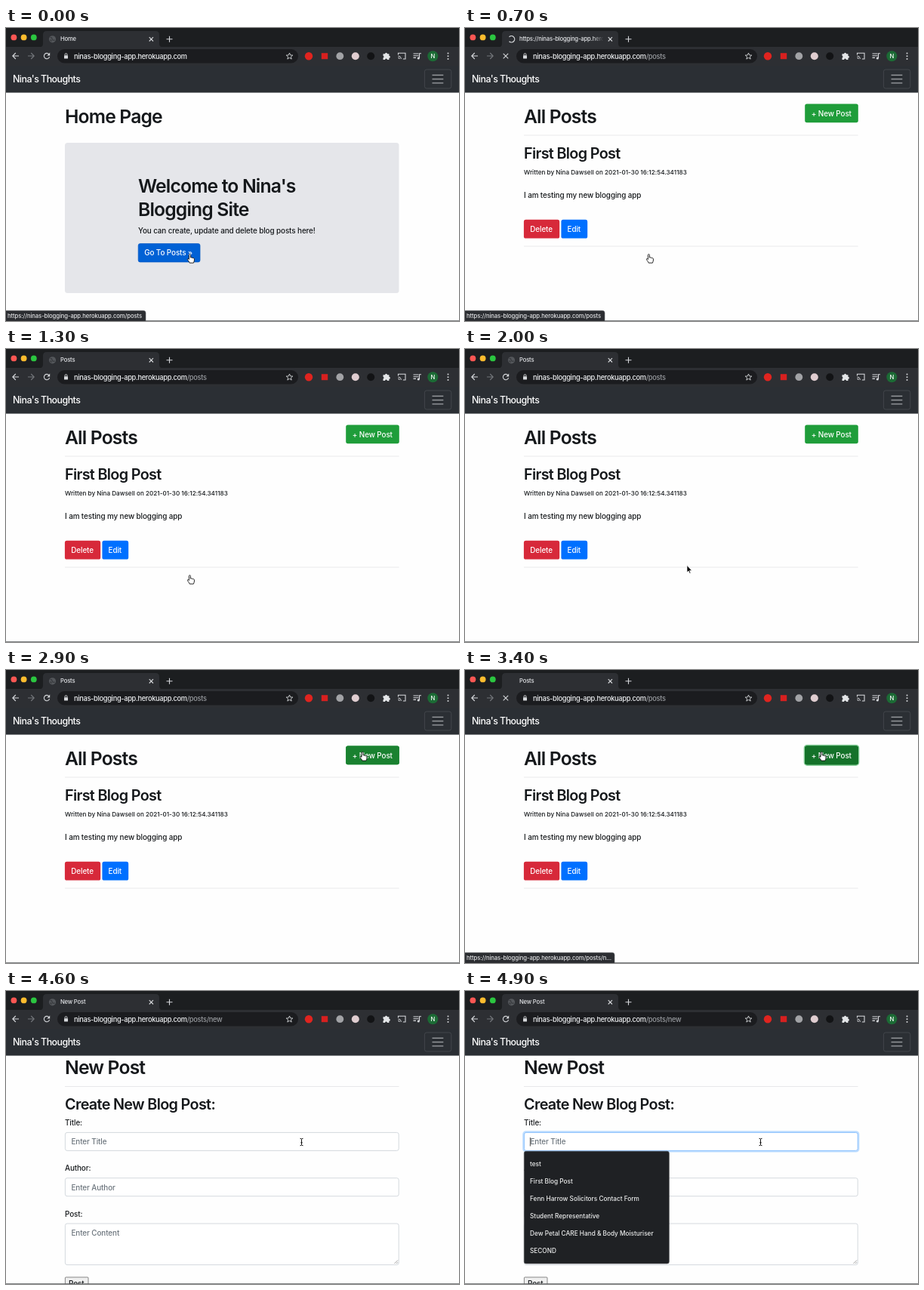
Write an HTML page that moves like this. It is 600x388 px and loops after 5000 ms.

```html
<!DOCTYPE html>
<html lang="en">
<head>
<meta charset="utf-8">
<title>Blogging app</title>
<style>
html, body { margin: 0; width: 100%; height: 100%; overflow: hidden; background: #fefefe; }
svg { display: block; width: 600px; height: 388px; }
text { font: 500 9.9px Inter, "Liberation Sans", sans-serif; letter-spacing: -.01em; font-optical-sizing: none; fill: #15181b; white-space: pre; }
.h1 { font-size: 24.7px; font-weight: 600; letter-spacing: -.034em; }
.h2 { font-size: 19.8px; font-weight: 600; letter-spacing: -.034em; }
.small { font-size: 8.15px; letter-spacing: .002em; }
.brand { font-size: 12.4px; letter-spacing: -.042em; fill: #fff; }
.tab { font-size: 7.7px; letter-spacing: -.025em; fill: #e4e6e9; }
.url { font-size: 9.25px; letter-spacing: -.034em; fill: #eceef0; }
.dim { fill: #989b9f; }
.tip { font-size: 7.7px; letter-spacing: -.013em; fill: #e2e3e5; }
.item { font-size: 8.25px; letter-spacing: 0; fill: #eceded; }
.btn { fill: #fff; }
.hint { fill: #6c757d; }
.hr { stroke: #e3e3e5; stroke-width: .8; }
.field { fill: #fff; stroke: #c9d0d6; stroke-width: .8; }
.icon { fill: none; stroke: #d6d8db; stroke-width: 1.1; }
.thin { stroke-width: .9; }
</style>
</head>
<body>
<svg viewBox="0 0 600 388">
  <defs>
    <linearGradient id="fade">
      <stop offset="0" stop-color="#2d2f33" stop-opacity="0"/>
      <stop offset="1" stop-color="#2d2f33"/>
    </linearGradient>
    <clipPath id="tabClip"><rect x="70" y="6" width="113" height="18"/></clipPath>
  </defs>
  <rect width="600" height="388" fill="#fefefe"/>

  <g id="home">
    <text class="h1" x="78" y="125.7">Home Page</text>
    <rect x="78" y="152" width="442.5" height="199" rx="3.5" fill="#e5e6ea"/>
    <text class="h1" x="175" y="218">Welcome to Nina's</text>
    <text class="h1" x="175" y="249">Blogging Site</text>
    <text x="175" y="271.5">You can create, update and delete blog posts here!</text>
    <rect id="goRing" x="174" y="284.5" width="84" height="26.5" rx="3.5" fill="none" stroke="#7fb2ee" stroke-width="2"/>
    <rect x="175.2" y="285.6" width="81.8" height="24.3" rx="2.5" fill="#0061d5" stroke="#0058c2" stroke-width=".7"/>
    <text class="btn" x="183.2" y="301.3">Go To Posts »</text>
  </g>

  <g id="posts">
    <text class="h1" x="78" y="125.7">All Posts</text>
    <rect id="newRing" x="449.7" y="99.8" width="71.6" height="26" rx="3.5" fill="none" stroke="#8fd0a0" stroke-width="2.2"/>
    <rect x="450.2" y="100.4" width="70.6" height="24.8" rx="2.6" fill="#1f9d3a"/>
    <rect id="newHover" x="450.2" y="100.4" width="70.6" height="24.8" rx="2.6" fill="#1a8130"/>
    <rect id="newDown" x="450.2" y="100.4" width="70.6" height="24.8" rx="2.6" fill="#15722a"/>
    <text class="btn" x="458.8" y="116.6">+ New Post</text>
    <path class="hr" d="M78 142H520.5M78 289H520.5"/>
    <text class="h2" x="78" y="173">First Blog Post</text>
    <text class="small" x="78" y="193.5">Written by Nina Dawsell on 2021-01-30 16:12:54.341183</text>
    <text x="78" y="224.5">I am testing my new blogging app</text>
    <rect x="77.9" y="253.8" width="47.3" height="24.8" rx="2.6" fill="#d7293a"/>
    <text class="btn" x="86.3" y="270">Delete</text>
    <rect x="127.4" y="253.8" width="34.8" height="24.8" rx="2.6" fill="#0070ff"/>
    <text class="btn" x="135.6" y="270">Edit</text>
  </g>

  <g id="new">
    <text class="h1" x="78" y="110.2">New Post</text>
    <path class="hr" d="M78 126.5H520.5"/>
    <text class="h2" x="78" y="157">Create New Blog Post:</text>
    <text x="78" y="178">Title:</text>
    <rect class="field" x="78.4" y="187.4" width="441.8" height="24" rx="2.6"/>
    <g id="focus">
      <rect x="77.2" y="186.2" width="444.2" height="26.4" rx="3.4" fill="none" stroke="#bfdeff" stroke-width="2"/>
      <rect x="78.4" y="187.4" width="441.8" height="24" rx="2.6" fill="#fff" stroke="#80bdff" stroke-width=".9"/>
    </g>
    <text class="hint" x="86.5" y="203">Enter Title</text>
    <path id="caret" d="M86.4 194V205.5" stroke="#222" stroke-width=".8"/>
    <text x="78" y="238.3">Author:</text>
    <rect class="field" x="78.4" y="247.7" width="441.8" height="24" rx="2.6"/>
    <text class="hint" x="86.5" y="263.5">Enter Author</text>
    <text x="78" y="298.7">Post:</text>
    <rect class="field" x="78.4" y="308" width="441.8" height="54.6" rx="2.6"/>
    <path d="M514.5 361L519 356.5M517.2 361L519 359.2" stroke="#777" stroke-width=".7"/>
    <text class="hint" x="86.5" y="323.7">Enter Content</text>
    <rect x="78.4" y="379" width="30.6" height="16" rx="1" fill="#efefef" stroke="#6b6b6b" stroke-width=".8"/>
    <text x="83" y="391">Post</text>
    <g id="list">
      <rect x="78.3" y="212.3" width="192" height="148.6" rx="2.5" fill="#1f2124" stroke="#45474a" stroke-width=".7"/>
      <text class="item" x="86" y="232.3">test</text>
      <text class="item" x="86" y="255.3">First Blog Post</text>
      <text class="item" x="86" y="278.3">Fenn Harrow Solicitors Contact Form</text>
      <text class="item" x="86" y="301.3">Student Representative</text>
      <text class="item" x="86" y="324.3">Dew Petal CARE Hand &amp; Body Moisturiser</text>
      <text class="item" x="86" y="347.3">SECOND</text>
    </g>
  </g>

  <!-- browser chrome -->
  <rect width="600" height="26" fill="#1c1e20"/>
  <circle cx="10.4" cy="12.4" r="3.9" fill="#fc5753"/>
  <circle cx="23.6" cy="12.4" r="3.9" fill="#fdbc2e"/>
  <circle cx="36.8" cy="12.4" r="3.9" fill="#2bc640"/>
  <path d="M44 25.5Q49 25.5 49 20.5V9Q49 4 54 4H198Q203 4 203 9V20.5Q203 25.5 208 25.5Z" fill="#2d2f33"/>
  <g id="globe">
    <circle cx="61.5" cy="14.8" r="4.6" fill="#54575b"/>
    <path d="M58.5 13Q61 11.8 61 14.3T64.8 16M60 17.8Q60.5 15.8 58 15.8" fill="none" stroke="#36383c" stroke-width="1.2"/>
  </g>
  <path id="spin" d="M61.5 10.6A4.2 4.2 0 1 1 57.3 14.8" fill="none" stroke="#e0e2e5" stroke-width="1.2"/>
  <g clip-path="url(#tabClip)">
    <text id="title" class="tab" x="72" y="17.3"></text>
    <rect x="169" y="8" width="14.5" height="14" fill="url(#fade)"/>
  </g>
  <path class="icon" d="M189.7 12.2L195 17.5M195 12.2L189.7 17.5M212.5 14.8H220.5M216.5 10.8V18.8"/>
  <rect y="25" width="600" height="25" fill="#2d2f33"/>
  <path class="icon" d="M17 37H9M12.8 33L8.8 37L12.8 41"/>
  <path class="icon" style="stroke:#73767a" d="M29 37H37M33.2 33L37.2 37L33.2 41"/>
  <g id="reload">
    <path class="icon" d="M57 34.8A3.7 3.7 0 1 0 57.6 38.3"/>
    <path d="M58.2 32.6V36.4H54.4Z" fill="#d6d8db"/>
  </g>
  <path id="stop" class="icon" d="M50.7 33.8L57.2 40.3M57.2 33.8L50.7 40.3"/>
  <rect x="68" y="28" width="319" height="18.5" rx="9.25" fill="#1b1c1f"/>
  <rect x="77" y="36.2" width="5" height="4.4" rx=".5" fill="#d6d8db"/>
  <path class="icon thin" d="M78.1 36.4V35A1.4 1.4 0 0 1 80.9 35V36.4"/>
  <text class="url" x="90" y="40.5">ninas-blogging-app.herokuapp.com<tspan id="path" class="dim"></tspan></text>
  <path class="icon thin" d="M375.5 33L376.7 35.9 379.8 36.1 377.4 38.1 378.2 41.1 375.5 39.4 372.8 41.1 373.6 38.1 371.2 36.1 374.3 35.9Z"/>
  <circle cx="401" cy="37.2" r="5.2" fill="#e0241f"/>
  <rect x="417.8" y="33.2" width="8.4" height="8" fill="#d8201f"/>
  <circle cx="442.3" cy="37.2" r="4.9" fill="#a2a3a6"/>
  <circle cx="462.8" cy="37.2" r="5" fill="#e0cdd0"/>
  <circle cx="483.2" cy="37.2" r="5" fill="#121315"/>
  <path d="M499.5 34.3H502A1.5 1.5 0 1 1 505 34.3H507.4V36.8A1.5 1.5 0 1 1 507.4 39.8V42H505A1.5 1.5 0 0 0 502 42H499.5V39.6A1.5 1.5 0 0 0 499.5 36.8Z" fill="#e4e6e8"/>
  <path class="icon" d="M519.5 35.5V33.2H529V41H525.8M519.5 37.2A3.8 3.8 0 0 1 523.3 41M519.5 39.4A1.6 1.6 0 0 1 521.1 41"/>
  <path class="icon" d="M539.5 34H546.5M539.5 36.7H546.5M539.5 39.4H543M547.5 40V33.8H550"/>
  <circle cx="546.3" cy="40" r="1.6" fill="#d6d8db"/>
  <circle cx="565.3" cy="37.2" r="7" fill="#1c6b35"/>
  <text class="tab" x="562.5" y="40" style="fill:#fff">N</text>
  <path d="M585.5 33.4V33.5M585.5 37.2V37.3M585.5 41V41.1" stroke="#d6d8db" stroke-width="2" stroke-linecap="round"/>

  <rect y="50" width="600" height="35.6" fill="#2b2f34"/>
  <text class="brand" x="9" y="72">Nina's Thoughts</text>
  <rect x="554.4" y="55" width="35.4" height="25" rx="2.8" fill="none" stroke="#484c51" stroke-width=".8"/>
  <path d="M564.5 62.3H579.3M564.5 67.6H579.3M564.5 72.9H579.3" stroke="#a0a3a6" stroke-width="1.2"/>
  <path d="M0 387.6H600" stroke="#55575a" stroke-width=".8"/>

  <g id="status">
    <path id="bubble" fill="#2b2d31" stroke="#5a5c60" stroke-width=".6"/>
    <text id="link" class="tip" x="2" y="383.6"></text>
  </g>

  <g id="cursor" stroke-linejoin="round">
    <path id="hand" fill="#fff" stroke="#111" stroke-width=".9" d="M-1 1C-1-.3 1-.3 1 1V4.6C1.3 3.9 2.8 4 2.9 5 3.3 4.4 4.5 4.6 4.6 5.4 5.2 5 6 5.4 6 6.2V8.5C6 10 5 10.4 5 11.6H-.2C-.4 10-2.6 8.6-3 6.8-3.1 5.8-2 5.7-1 6.9Z"/>
    <path id="arrow" fill="#000" stroke="#fff" stroke-width=".7" d="M0 0V9.3L2.1 7.4 3.6 10.8 5 10.2 3.6 6.9H6.5Z"/>
    <path id="beam" fill="none" stroke="#111" stroke-width="1" d="M-2-4.7Q0-4.7 0-3.5Q0-4.7 2-4.7M0-3.5V3.5M-2 4.7Q0 4.7 0 3.5Q0 4.7 2 4.7M-1.2 .8H1.2"/>
  </g>
</svg>
<script>
const LOOP = 5000, STEP = 100;
const host = 'https://ninas-blogging-app.herokuapp.com';
const el = {};
document.querySelectorAll('[id]').forEach(n => el[n.id] = n);

const pages = {
  home: { title: 'Home', path: '' },
  posts: { title: 'Posts', path: '/posts' },
  new: { title: 'New Post', path: '/posts/new' }
};

// Held values: [time, value]
const page = [[0, 'home'], [700, 'posts'], [3800, 'new']];
const load = [[0, 'idle'], [300, 'wait'], [700, 'spin'], [900, 'idle'],
  [3300, 'wait'], [3800, 'spin'], [4000, 'idle']];
const pointer = [[0, 'hand'], [1900, 'arrow'], [2500, 'hand'], [4300, 'arrow'], [4600, 'beam']];

// Eased values: [time, ...numbers]
const move = [[0, 243.4, 299.5], [1800, 243.4, 299.5], [2000, 294, 286.5], [2200, 355, 238],
  [2400, 435, 150], [2500, 462, 118], [2600, 472, 108.5], [4200, 472, 108.5],
  [4400, 430, 158], [4600, 391.5, 200]];
const opacity = {
  status: [[0, 1], [700, 1], [800, .6], [900, .25], [1000, 0], [3000, 0], [3100, 1],
    [3900, 1], [4000, .6], [4100, .25], [4200, 0]],
  goRing: [[200, 0], [300, 1]],
  newHover: [[2400, 0], [2600, 1]],
  newDown: [[3100, 0], [3200, 1]],
  newRing: [[3100, 0], [3300, 1]],
  focus: [[4700, 0], [4900, 1]],
  caret: [[4700, 0], [4800, 1]],
  list: [[4700, 0], [4800, 1]]
};

const held = (rows, t) => rows.filter(r => r[0] <= t).pop()[1];

function blend(rows, t) {
  const i = rows.findIndex(r => r[0] > t);
  if (i < 0) return rows[rows.length - 1].slice(1);
  if (i === 0) return rows[0].slice(1);
  const a = rows[i - 1], b = rows[i], k = (t - a[0]) / (b[0] - a[0]);
  return a.slice(1).map((v, j) => v + (b[j + 1] - v) * k);
}

const show = (id, on) => el[id].style.display = on ? '' : 'none';

function draw(t) {
  const now = held(page, t), phase = held(load, t), kind = held(pointer, t);
  for (const id in pages) show(id, id === now);
  for (const id of ['hand', 'arrow', 'beam']) show(id, id === kind);
  for (const id in opacity) el[id].style.opacity = blend(opacity[id], t)[0];

  show('globe', phase === 'idle');
  show('reload', phase === 'idle');
  show('stop', phase !== 'idle');
  show('spin', phase === 'spin');
  el.spin.setAttribute('transform', `rotate(${(t % 800) * .45} 61.5 14.8)`);
  el.title.textContent = phase === 'spin' ? host : pages[now].title;
  el.path.textContent = pages[now].path;

  const late = t >= 3000, w = late ? 198 : 185;
  el.link.textContent = host + (late ? '/posts/n...' : '/posts');
  el.bubble.setAttribute('d', `M-1 374.3H${w - 3}Q${w} 374.3 ${w} 377.3V389H-1Z`);

  el.cursor.setAttribute('transform', `translate(${blend(move, t)})`);
}

const start = performance.now();
function tick() {
  const t = (performance.now() - start) % LOOP;
  draw(Math.floor(t / STEP) * STEP);
  requestAnimationFrame(tick);
}
tick();
</script>
</body>
</html>
```
